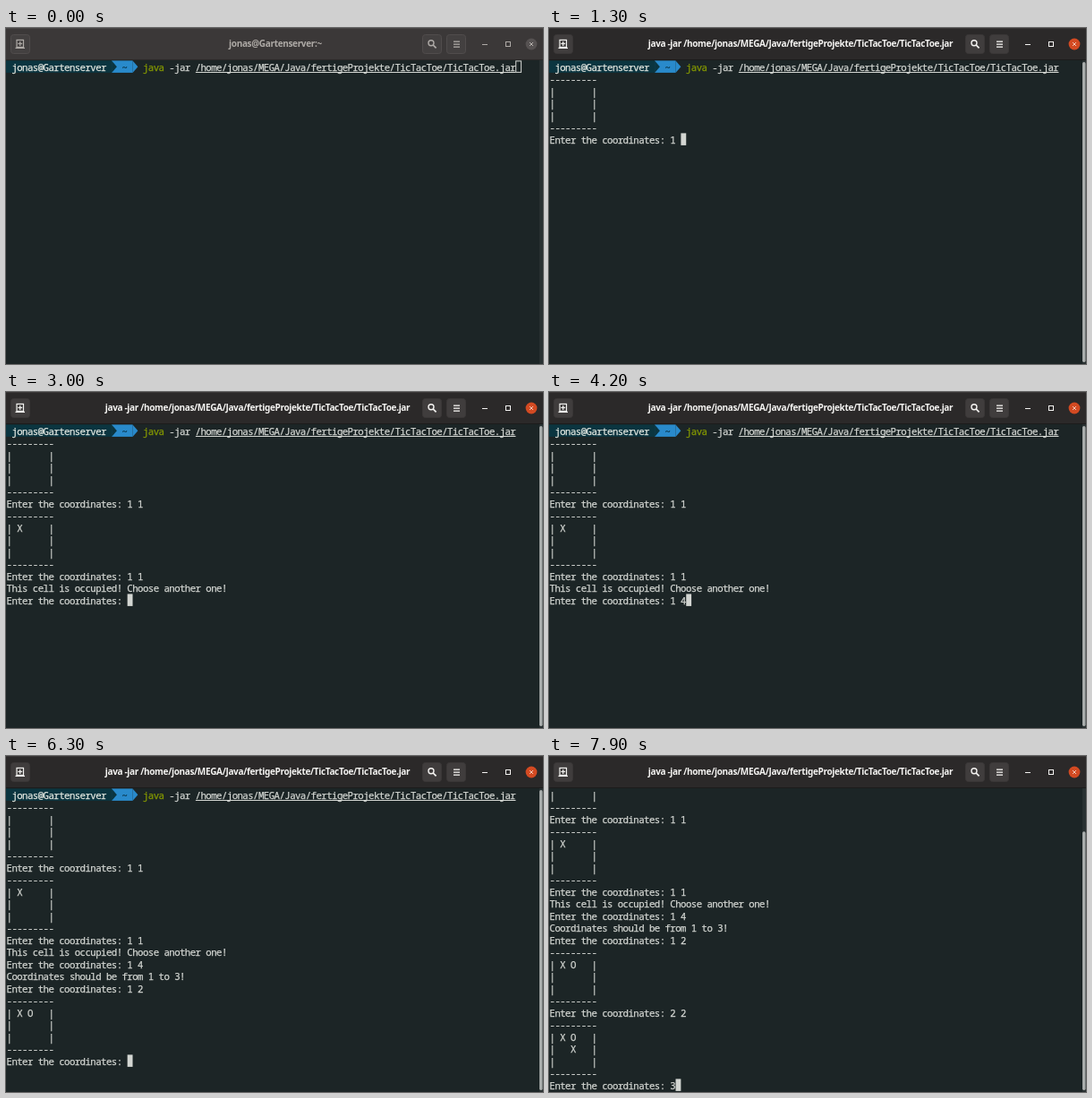
Recreate the animation shown at these times as an HTML page with a canvas. Size 600 px wide and 375 px high, loop 8 s.

```html
<!DOCTYPE html>
<html lang="en">
<head>
<meta charset="utf-8">
<title>Terminal game</title>
<style>
  html, body { margin: 0; width: 100%; height: 100%; overflow: hidden; background: #1c2526; }
  canvas { display: block; width: 100vw; height: 100vh; }
</style>
</head>
<body>
<canvas id="stage" width="600" height="375"></canvas>
<script>
const canvas = document.getElementById('stage');
const ctx = canvas.getContext('2d');

const W = 600, H = 375, LOOP = 8000;
const LEFT = 0.8, CELL = 5.863, TOP = 36.4, ROW = 13.5, BASE = 11.2, VISIBLE = 25;
const FOCUS_AT = 300, RUN_AT = 500;
const MONO = '10.7px "Noto Sans Mono", monospace';
const BOLD = 'bold 10px "Noto Sans", sans-serif';
const INK = '#d3d6d2', BACK = '#1c2526';

const USER = 'jonas@Gartenserver';
const PATH = '/home/jonas/MEGA/Java/fertigeProjekte/TicTacToe/TicTacToe.jar';
const PATH_COL = 36;

const ASK = 'Enter the coordinates: ';
const RULE = '-'.repeat(9);
const board = (...rows) =>
  [RULE, ...rows.map(r => `| ${[...r].join(' ')} |`), RULE, ASK].join('\n');

// Everything printed or typed below the prompt line, by time
const LOG = [
  [RUN_AT, '\n'],
  [700, board('   ', '   ', '   ')],
  [1100, '1'], [1300, ' '], [1500, '1'],
  [1900, '\n' + board('X  ', '   ', '   ')],
  [2300, '1'], [2500, ' '], [2700, '1'],
  [3000, '\nThis cell is occupied! Choose another one!\n' + ASK],
  [3400, '1'], [3600, ' '], [4000, '4'],
  [4300, '\nCoordinates should be from 1 to 3!\n' + ASK],
  [4900, '1'], [5100, ' '], [5700, '2'],
  [6300, '\n' + board('XO ', '   ', '   ')],
  [6700, '2'], [6900, ' '], [7200, '2'],
  [7500, '\n' + board('XO ', ' X ', '   ')],
  [7900, '3']
];

const colX = col => LEFT + col * CELL;

function rect(x, y, w, h, color) {
  ctx.fillStyle = color;
  ctx.fillRect(x, y, w, h);
}

function shape(points, color) {
  ctx.fillStyle = color;
  ctx.beginPath();
  points.forEach(([x, y]) => ctx.lineTo(x, y));
  ctx.fill();
}

function stroke(points, color, width = 1) {
  ctx.strokeStyle = color;
  ctx.lineWidth = width;
  ctx.beginPath();
  points.forEach(([x, y], i) => i ? ctx.lineTo(x, y) : ctx.moveTo(x, y));
  ctx.stroke();
}

function disc(x, y, r, color) {
  ctx.fillStyle = color;
  ctx.beginPath();
  ctx.arc(x, y, r, 0, Math.PI * 2);
  ctx.fill();
}

// Terminal text: one slightly emboldened glyph per grid cell
function print(text, col, y, color) {
  ctx.font = MONO;
  ctx.textAlign = 'center';
  ctx.fillStyle = ctx.strokeStyle = color;
  ctx.lineWidth = 0.25;
  [...text].forEach((ch, i) => {
    if (ch === ' ') return;
    const x = colX(col + i + 0.5);
    ctx.fillText(ch, x, y + BASE);
    ctx.strokeText(ch, x, y + BASE);
  });
}

function button(x, focused) {
  ctx.beginPath();
  ctx.roundRect(x + 0.5, 7.5, 21, 21, 3);
  ctx.fillStyle = focused ? '#403d3d' : '#434040';
  ctx.fill();
  ctx.lineWidth = 1;
  ctx.strokeStyle = focused ? '#3a3737' : '#504c4c';
  ctx.stroke();
}

function titleBar(t) {
  const focused = t >= FOCUS_AT, running = t >= RUN_AT;
  const ink = focused ? '#f4f3f1' : '#aeaaa6';
  rect(0, 0, W, 36, focused ? '#2b2929' : '#3b3838');
  rect(0, 0, W, 1, focused ? '#393636' : '#484545');
  rect(0, 35, W, 1, focused ? '#1c1b1b' : '#2b2929');
  [5, 465, 492].forEach(x => button(x, focused));

  // New tab
  ctx.strokeStyle = ink;
  ctx.lineWidth = 1.2;
  ctx.strokeRect(12, 13.4, 7.5, 8);
  stroke([[15.75, 15], [15.75, 20]], ink, 1.2);
  stroke([[13.3, 17.5], [18.2, 17.5]], ink, 1.2);
  stroke([[10.5, 22.4], [21, 22.4]], ink, 1.2);

  // Search
  ctx.lineWidth = 1.4;
  ctx.beginPath();
  ctx.arc(475, 16.8, 3, 0, Math.PI * 2);
  ctx.stroke();
  stroke([[477.2, 19], [480.6, 22.4]], ink, 1.7);

  // Menu
  [14.5, 17.5, 20.5].forEach(y => rect(500, y, 7, 1.3, ink));

  // Window controls
  rect(532, 18, 6, 1, ink);
  ctx.strokeStyle = ink;
  ctx.lineWidth = 1;
  ctx.strokeRect(558.5, 15.5, 5, 5);
  disc(587, 18, 6.4, focused ? '#d34a22' : '#565252');
  const cross = focused ? '#f0c4b4' : '#b5b0ac';
  stroke([[585, 16], [589, 20]], cross);
  stroke([[589, 16], [585, 20]], cross);

  ctx.font = BOLD;
  ctx.letterSpacing = '-0.34px';
  ctx.textAlign = 'center';
  ctx.fillStyle = ink;
  ctx.fillText(running ? 'java -jar ' + PATH : USER + ':~', running ? 281 : 301, 21.4);
  ctx.letterSpacing = '0px';
}

function promptLine(y) {
  const a = colX(20), b = colX(24), mid = y + ROW / 2, end = y + ROW;
  const teal = '#0b3540', blue = '#298acb';
  rect(0, y, a, ROW, teal);
  rect(a, y, b - a, ROW, blue);
  shape([[a, y], [a + CELL, mid], [a, end]], teal);
  shape([[b, y], [b + CELL, mid], [b, end]], blue);
  print(USER, 1, y, '#e3e7e0');
  print('~', 22, y, '#0b3a52');
  print('java', 26, y, '#859900');
  print('-jar', 31, y, INK);
  print(PATH, PATH_COL, y, INK);
  rect(colX(PATH_COL), y + 12.6, PATH.length * CELL, 1, INK);
}

function terminal(t) {
  const text = LOG.filter(([at]) => at <= t).map(([, s]) => s).join('');
  const lines = text.split('\n');
  const skip = Math.max(0, lines.length - VISIBLE);
  const rowY = i => TOP + (i - skip) * ROW;

  lines.forEach((line, i) => {
    if (i < skip) return;
    if (i === 0) promptLine(rowY(0));
    else print(line, 0, rowY(i), INK);
  });

  const last = lines.length - 1;
  const x = colX(last ? lines[last].length : PATH_COL + PATH.length);
  if (t < FOCUS_AT) {
    ctx.strokeStyle = INK;
    ctx.lineWidth = 1;
    ctx.strokeRect(x + 0.2, rowY(0) + 0.5, CELL, ROW - 1);
  } else {
    rect(x, rowY(last), CELL, ROW, INK);
  }

  // Scroll bar
  const y = 38 + 336 * skip / Math.max(lines.length, VISIBLE);
  rect(596, 36, 4, H - 36, '#293132');
  if (t >= FOCUS_AT) {
    ctx.fillStyle = '#a9adac';
    ctx.beginPath();
    ctx.roundRect(596, y, 3.5, 373 - y, 1.7);
    ctx.fill();
  }
}

function draw() {
  const t = performance.now() % LOOP;
  rect(0, 0, W, H, BACK);
  terminal(t);
  titleBar(t);
  requestAnimationFrame(draw);
}
draw();
</script>
</body>
</html>
```
